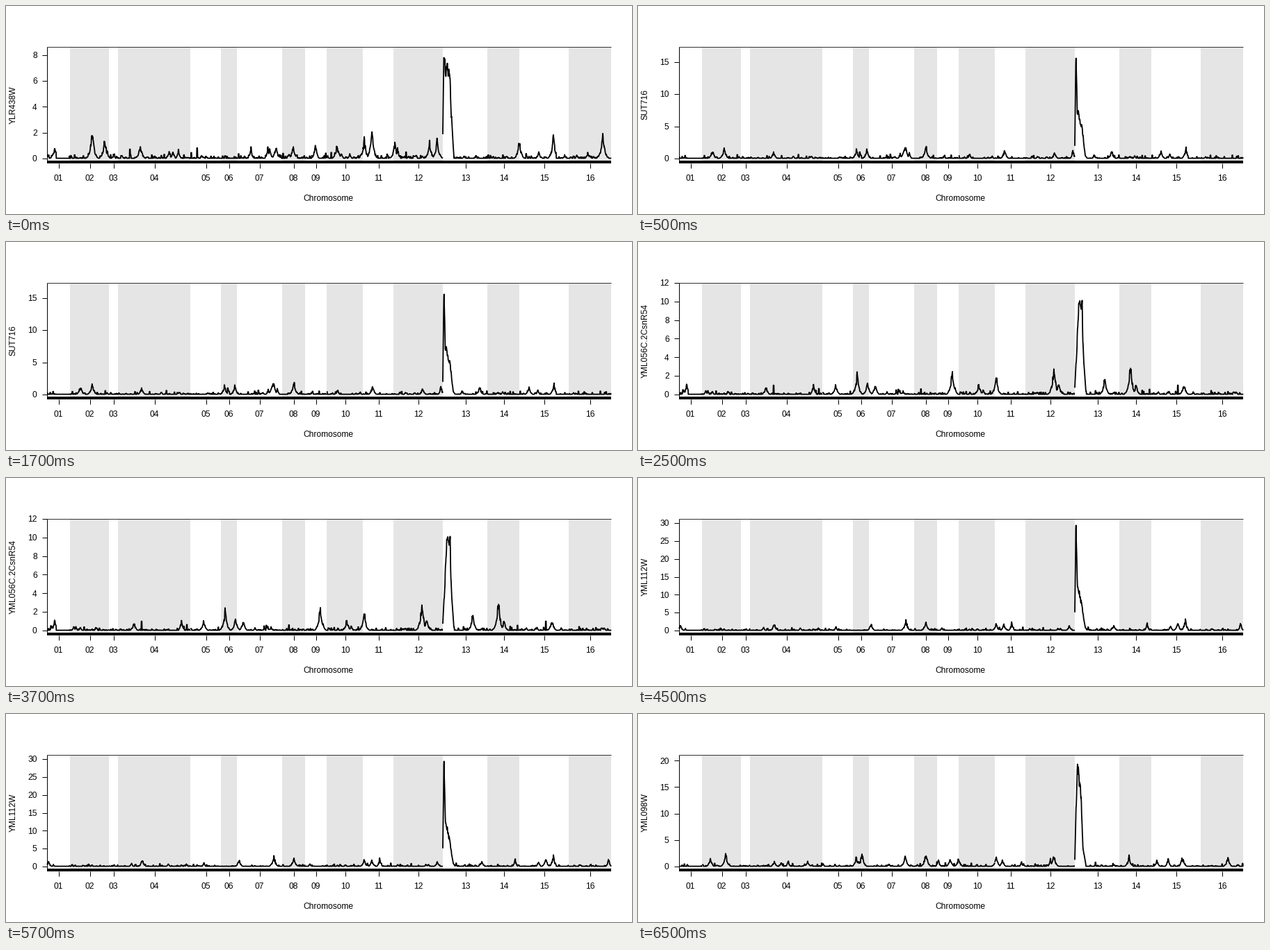
A matplotlib script that plays this animation: 900 px wide and 300 px high, repeating every 8000 ms.

```python
import numpy as np
import matplotlib.pyplot as plt
from matplotlib.animation import FuncAnimation
from matplotlib.patches import Rectangle

WIDTH, HEIGHT, DPI = 900, 300, 100
PX = 72 / DPI  # points per pixel
LEFT, RIGHT, TOP, ZERO, BAR = 58.5, 870, 58.5, 220, 225
EDGES = [59, 92, 148, 161, 265, 309, 332, 397, 430,
         461, 513, 557, 628, 692, 738, 809, 870]
UNMAPPED = [(72, 91), (791, 794.5)]
MAIN_START = 628
SPACING = 0.35

plt.rcParams["font.family"] = "Liberation Sans"
plt.rcParams["font.size"] = 12 * PX
fig = plt.figure(figsize=(WIDTH / DPI, HEIGHT / DPI), dpi=DPI, facecolor="white")
ax = fig.add_axes([0, 0, 1, 1])
ax.set(xlim=(0, WIDTH), ylim=(HEIGHT, 0))
ax.axis("off")

scenes = []


def stroke(xs, ys, width=1.0, **kw):
    return ax.plot(xs, ys, **{"color": "black", "lw": width * PX,
                              "solid_capstyle": "butt", **kw})[0]


def draw_frame():
    for left, right in zip(EDGES[1::2], EDGES[2::2]):
        ax.add_patch(Rectangle((left, TOP), right - left, BAR - TOP,
                               fc="#e5e5e5", lw=0))
    stroke([LEFT, RIGHT], [TOP, TOP], color="#333333")
    stroke([LEFT, LEFT], [TOP, BAR], zorder=3)
    stroke([LEFT, RIGHT], [BAR, BAR], 4, zorder=3)
    for number, (left, right) in enumerate(zip(EDGES, EDGES[1:]), 1):
        mid = (left + right) // 2 + 0.5
        stroke([mid, mid], [BAR + 2, 234])
        ax.text(mid, 252.5, f"{number:02d}", ha="center", va="baseline")
    ax.text(463.5, 281.3, "Chromosome", ha="center", va="baseline")


def draw_axis(label, unit, step):
    artists = [ax.text(14, 142.5, label, rotation=90, rotation_mode="anchor",
                       ha="center", va="baseline")]
    for value in range(0, int((ZERO - TOP) / unit) + 1, step):
        y = ZERO - value * unit
        artists.append(stroke([51.5, LEFT], [y, y]))
        artists.append(ax.text(44.7, y + 4.3, str(value), ha="right", va="baseline"))
    return artists


def hills(x, centers, heights, width):
    """Upper envelope of pointed hills."""
    distance = np.abs(x - np.array(centers)[:, None])
    return (np.array(heights)[:, None] * np.exp(-distance / width)).max(axis=0)


def held(values, run=3):
    """Keep each value for a short run, like neighbouring markers do."""
    return np.repeat(values[::run], run)[:len(values)]


def add_scene(label, step, noise, ridge, peaks):
    """Ridge and peaks are in score units, noise is in pixels."""
    rng = np.random.default_rng(len(scenes) + 4)
    unit = 155 / max(score for _, score in ridge)
    artists = draw_axis(label, unit, step)
    small = rng.uniform(LEFT, RIGHT, 75)
    small_heights = rng.exponential(2.6 * noise, small.size)

    for left, right in zip(EDGES, EDGES[1:]):
        x = np.arange(left, right + SPACING, SPACING)
        n = len(x)
        speckle = held(rng.exponential(noise, n) * (rng.random(n) < 0.6))
        rough = 1 - 0.4 * held(rng.random(n), 2)
        shape = np.maximum(hills(x, small, small_heights, 2),
                           hills(x, list(peaks), unit * np.array(list(peaks.values())), 2.8))
        # Subtracting a little brings the skirts of the hills down to the floor.
        h = np.maximum(speckle, (shape - 1.5) * rough)
        if left == MAIN_START:
            jitter = 1 - 0.16 * held(rng.random(n), 2)
            h = np.maximum(h, unit * np.interp(x, *zip(*ridge), right=0) * jitter)
        for start, stop in UNMAPPED:
            h[(x > start) & (x < stop)] = 0
        artists.append(stroke(x, ZERO - np.maximum(h, 0.4), 1.8, zorder=4))
    scenes.append(artists)


draw_frame()

add_scene(
    "YLR438W", 2, 2.1,
    [(628, 2), (629.3, 8.2), (631, 8.3), (632, 7.4), (638, 7.3), (640, 3.8), (644, 0.2)],
    {70: 1.1, 124: 2.6, 142: 1.9, 193: 1.4, 388: 1.2, 413: 1.2, 476: 1.4, 515: 1.9,
     526: 2.7, 559: 1.6, 609: 1.6, 620: 1.9, 738: 1.7, 787: 2.1, 858: 2.4})

add_scene(
    "SUT716", 5, 1.2,
    [(628, 2), (629.5, 16.7), (630.2, 16), (631.5, 8), (638, 5.5), (643, 0.5), (646, 0)],
    {107: 1.8, 124: 2.3, 195: 1.3, 314: 1.8, 329: 1.7, 384: 3, 414: 2.6, 527: 1.7,
     599: 1.3, 681: 1.6, 752: 1.4, 788: 2})

add_scene(
    "YML056C.2CsnR54", 2, 1.6,
    [(628, 0.8), (631, 5.5), (633.5, 10.3), (637, 10), (638.3, 11.55), (640, 5), (644, 0.3)],
    {70: 1.3, 184: 1.1, 284: 1.4, 315: 2.7, 330: 1.8, 341: 1.3, 452: 3.4, 490: 1.5,
     515: 2.5, 598: 3.9, 605: 1.6, 671: 2.1, 708: 4, 716: 1.4, 785: 1.5})

add_scene(
    "YML112W", 5, 1,
    [(628, 6), (629.5, 30), (630.2, 29), (631.7, 14), (636, 10), (643, 1), (646, 0)],
    {61: 1.9, 196: 2.6, 335: 2.5, 385: 3.9, 414: 3.5, 515: 2.5, 526: 2.3, 620: 1.8,
     684: 2.1, 776: 3, 787: 3.6})

add_scene(
    "YML098W", 5, 1.1,
    [(628, 1.5), (630, 13), (631.8, 20.3), (636.5, 16), (638.5, 9), (639.5, 4), (644, 0.3)],
    {104: 1.9, 126: 3.2, 196: 1.4, 244: 1.5, 314: 2.4, 322: 3.2, 384: 2.7, 414: 3.4,
     449: 2, 461: 2.1, 515: 2.5, 524: 1.7, 598: 2.9, 706: 2.4, 746: 1.5, 784: 1.7, 848: 2.3})


def update(frame):
    current = (frame + 3) // 4  # the first plot has one tick, the rest up to four
    for i, artists in enumerate(scenes):
        for artist in artists:
            artist.set_visible(i == current)
    return []


anim = FuncAnimation(fig, update, frames=16, interval=500, repeat=True,
                     repeat_delay=0, init_func=lambda: update(0), blit=False)
plt.show()
```
